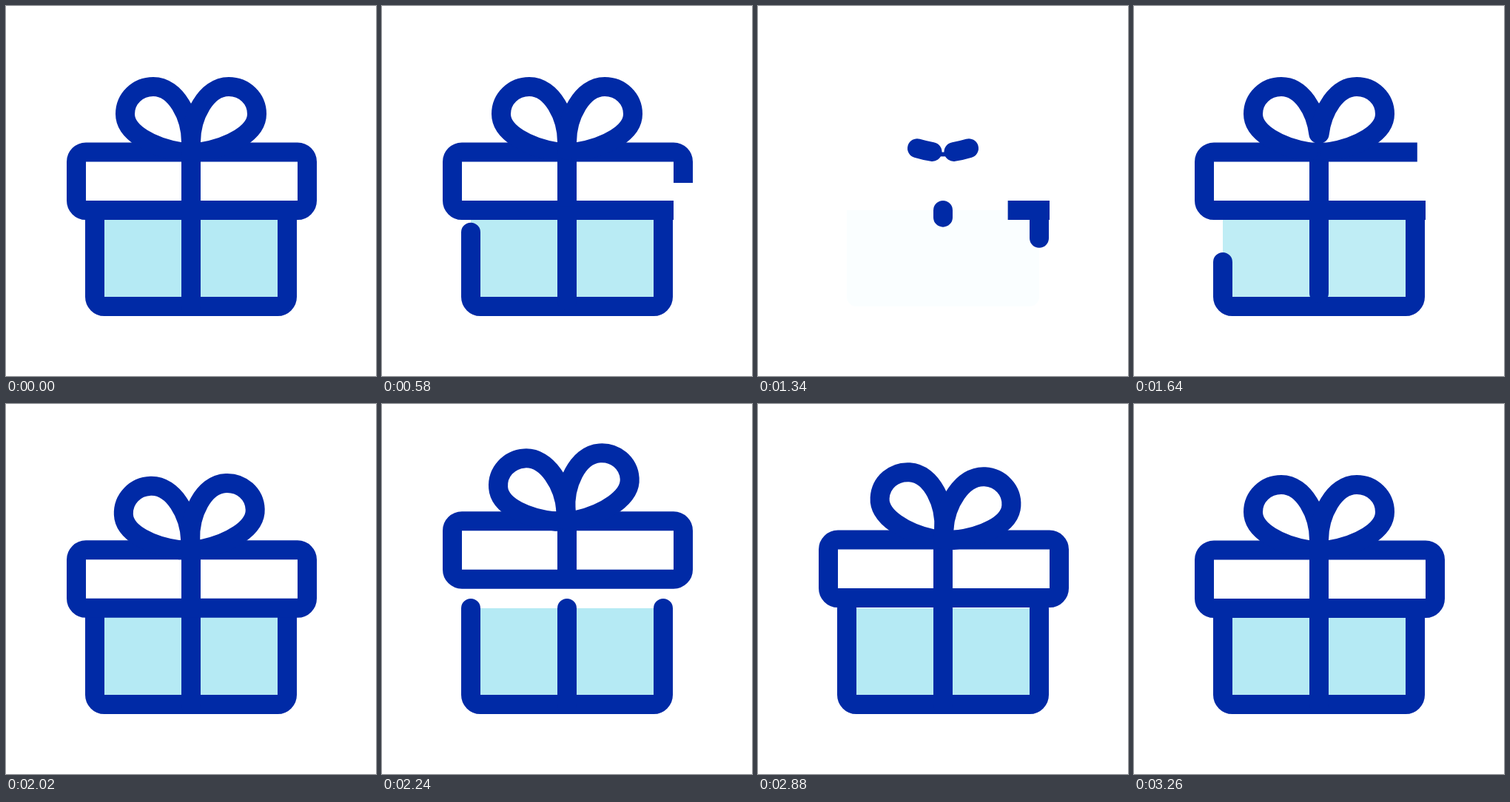
Write an HTML page that moves like this. It is 500 px wide and 500 px high and loops after 4 s.

```html
<!DOCTYPE html>
<html lang="en">
<head>
<meta charset="utf-8">
<title>Gift box</title>
<style>
  html, body { margin: 0; width: 100%; height: 100%; overflow: hidden; background: #fff; }
  svg { display: block; width: 100vw; height: 100vh; }
  .ink { fill: none; stroke: #002aa6; stroke-width: 26; stroke-linejoin: round; }
  .round { stroke-linecap: round; }
</style>
</head>
<body>
<svg viewBox="0 0 500 500">
  <path id="fill" fill="#b5eaf4" d="M120 276V393a13 13 0 0 0 13 13H367a13 13 0 0 0 13-13V276Z"/>
  <path class="ink round" pathLength="1" d="M380 276V393a13 13 0 0 1-13 13H133a13 13 0 0 1-13-13V276"/>
  <path class="ink round" pathLength="1" d="M250 276V406"/>
  <g id="lid">
    <path class="ink" pathLength="1" d="M394 276H108a13 13 0 0 1-13-13V210.5a13 13 0 0 1 13-13H394a13 13 0 0 1 13 13V263a13 13 0 0 1-13 13Z"/>
    <path class="ink" pathLength="1" d="M250 197.5V276"/>
    <g id="bow">
      <path class="ink round" pathLength="1" d="M235.5 197C199 191 161 172 161 146C161 125 178 109 199 109C230 109 250 150 250 184V197Z"/>
      <path class="ink round" pathLength="1" d="M264.5 197C301 191 339 172 339 146C339 125 322 109 301 109C270 109 250 150 250 184V197Z"/>
    </g>
  </g>
</svg>
<script>
  const LOOP = 4000, DELAY = 7.5;

  // Each track is a list of [time, value], eased between neighbours.
  const TRACE = [[500, 1], [1000, 0], [1250, 0], [1750, 1]];
  const LIFT = [[2000, 0], [2500, -87.3], [3000, 0]];
  const TILT = [[1750, 0], [2250, -4], [2750, 4], [3250, 0]];

  const $ = id => document.getElementById(id);
  const fill = $('fill'), lid = $('lid'), bow = $('bow');
  const lines = document.querySelectorAll('.ink');

  const ease = u => u * u * (3 - 2 * u);

  function valueAt(track, t) {
    if (t <= track[0][0]) return track[0][1];
    for (let i = 1; i < track.length; i++) {
      const [t0, a] = track[i - 1], [t1, b] = track[i];
      if (t < t1) return a + (b - a) * ease((t - t0) / (t1 - t0));
    }
    return track[track.length - 1][1];
  }

  function draw(time) {
    const t = time % LOOP - DELAY;
    const part = valueAt(TRACE, t);
    const dash = part < 1 ? part + ' 2' : 'none';
    for (const line of lines) {
      line.style.strokeDasharray = dash;
      line.style.visibility = part < 0.001 ? 'hidden' : 'visible';
    }
    fill.style.opacity = part;
    lid.setAttribute('transform', `translate(0 ${valueAt(LIFT, t)})`);
    bow.setAttribute('transform', `rotate(${valueAt(TILT, t)} 250 205)`);
  }

  const start = performance.now();
  function tick() {
    draw(performance.now() - start);
    requestAnimationFrame(tick);
  }
  tick();
</script>
</body>
</html>
```
